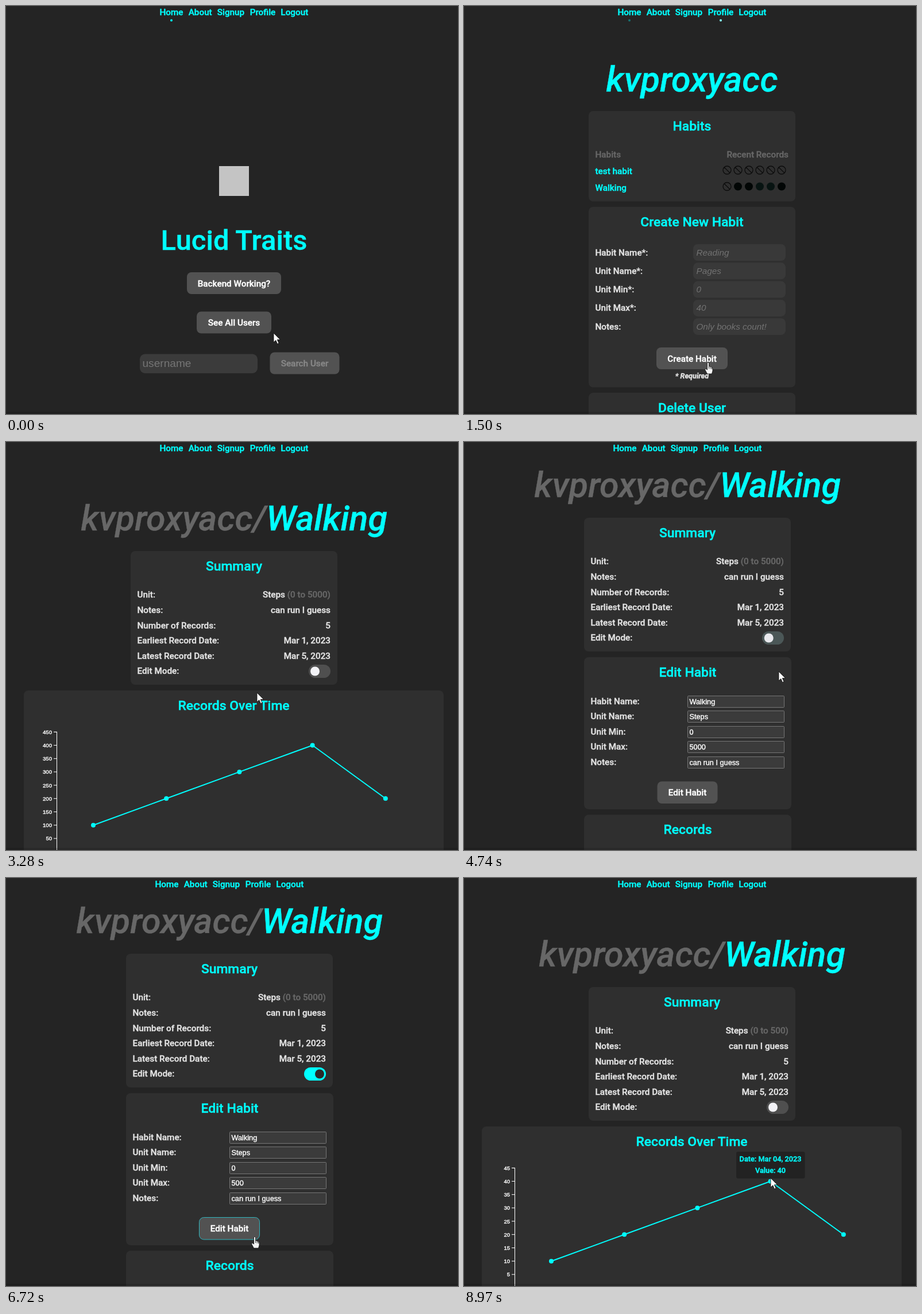
Recreate the animation shown at these times as an HTML page. Size 787x711 px, loop 9040 ms.

```html
<!DOCTYPE html>
<html lang="en">
<head>
<meta charset="utf-8">
<title>Habit tracker demo</title>
<style>
  html, body { margin: 0; width: 100%; height: 100%; overflow: hidden; background: #242424; }
  svg { display: block; }
  text { font: 500 15.28px Roboto, sans-serif; white-space: pre; stroke-width: .4px; }
  .h1 { font-size: 48.9px; }
  .user { font-size: 61.1px; font-style: italic; }
  .h2 { font-size: 22.9px; }
  .ph { font: italic 15.28px "Liberation Sans", Arial, sans-serif; }
  .big { font: 19.1px "Liberation Sans", Arial, sans-serif; }
  .ph, .big { stroke-width: 0; }
  .field { font: 12.73px "Liberation Sans", Arial, sans-serif; }
  .tick { font: 9.55px "Liberation Sans", Arial, sans-serif; }
  .tip { font-size: 12.73px; }
  .req { font-size: 12.7px; font-style: italic; font-weight: 700; }
</style>
</head>
<body>
<svg id="stage" width="787" height="711" viewBox="0 0 787 711"></svg>
<script>
const LOOP = 9040, CYAN = '#00ffff', TEXT = '#e3e3e3', GRAY = '#676767';
const USER = 'kvproxyacc', APP = 'Lucid Traits';

// a hairline stroke gives the text its slightly heavy look
const text = (x, y, s, { fill = TEXT, at = 'start', cls = '', id = '' } = {}) =>
  `<text x="${x}" y="${y}" fill="${fill}" stroke="${fill}" text-anchor="${at}" class="${cls}" id="${id}">${s}</text>`;
const mid = (x, y, s, cls = '', fill = CYAN) => text(x, y, s, { fill, cls, at: 'middle' });
const box = (x, y, w, h, fill, r = 8, more = '') =>
  `<rect x="${x}" y="${y}" width="${w}" height="${h}" rx="${r}" fill="${fill}" ${more}/>`;
const panel = (x, y, w, h, title, base) =>
  box(x, y, w, h, '#2f2f2f') + mid(x + w / 2, base, title, 'h2');
const button = (x, y, w, h, label, fill = '#fff', more = '') =>
  box(x, y, w, h, '#525252', 8, more) + mid(x + w / 2, y + 24.5, label, '', fill);
const dot = (x, y, r, more = '') => `<circle cx="${x}" cy="${y}" r="${r}" fill="${CYAN}" ${more}/>`;
const group = (id, ...parts) => `<g id="${id}">${parts.join('')}</g>`;
const each = (list, fn) => list.map(fn).join('');

const nav = group('nav',
  each([['Home', 288], ['About', 338.2], ['Signup', 391.5], ['Profile', 447], ['Logout', 502.3]],
    ([s, x]) => mid(x, 16, s)),
  dot(288, 25, 2, 'id="homeDot"'), dot(447, 25, 2, 'id="profileDot" style="fill:#8ff"'));

const home = group('home',
  box(371, 279, 52, 52, '#c4c4c4', 0),
  mid(397, 425, APP, 'h1'),
  button(315, 464, 164, 38, 'Backend Working?'),
  button(332, 532.5, 130, 38, 'See All Users'),
  box(233, 606.5, 205, 33.5, '#3b3b3b', 9),
  text(237.5, 629, 'username', { fill: '#757575', cls: 'big' }),
  button(459.5, 603.5, 121, 38, 'Search User', '#878787'));

const noRecord = (x, y) =>
  `<path d="M${x - 5} ${y - 5}l10 10M${x - 7} ${y}a7 7 0 1 0 14 0a7 7 0 1 0-14 0" fill="none" stroke="#0c0c0c" stroke-width="1.3"/>`;
const days = [0, 1, 2, 3, 4, 5].map(i => 458 + 19 * i);

const profile = group('profile',
  mid(397, 148.5, USER, 'user'),
  panel(217, 183, 360, 157.5, 'Habits', 217),
  text(228.5, 264, 'Habits', { fill: GRAY }),
  text(565, 264, 'Recent Records', { fill: GRAY, at: 'end' }),
  text(228.5, 293, 'test habit', { fill: CYAN }),
  text(228.5, 321.5, 'Walking', { fill: CYAN }),
  each(days, x => noRecord(x, 286)),
  noRecord(458, 314.5),
  each(days.slice(1), (x, i) => dot(x, 314.5, 7, `style="fill:${i == 2 || i == 3 ? '#081412' : '#020605'}"`)),
  panel(217, 350, 360, 314.5, 'Create New Habit', 384),
  each([['Habit Name*:', 'Reading'], ['Unit Name*:', 'Pages'], ['Unit Min*:', '0'],
    ['Unit Max*:', '40'], ['Notes:', 'Only books count!']], ([label, hint], i) => {
    const y = 434.5 + 32.3 * i;
    return text(228.5, y, label) + box(399, y - 19.5, 161, 29, '#393939', 8) +
      text(404.5, y, hint, { fill: '#727272', cls: 'ph' });
  }),
  button(335, 595, 124, 38, 'Create Habit'),
  mid(397, 649, '* Required', 'req', TEXT),
  panel(217, 674, 360, 60, 'Delete User', 708));

const rows = [['Unit:', `Steps <tspan fill="${GRAY}" stroke="${GRAY}" id="range"></tspan>`],
  ['Notes:', 'can run I guess'], ['Number of Records:', '5'], ['Earliest Record Date:', 'Mar 1, 2023'],
  ['Latest Record Date:', 'Mar 5, 2023'], ['Edit Mode:', '']];
const summary = group('summary',
  text(453, 154, USER + '/', { fill: GRAY, cls: 'user', at: 'end' }),
  text(453, 154, 'Walking', { fill: CYAN, cls: 'user' }),
  panel(217, 190, 360, 233, 'Summary', 224),
  each(rows, ([label, value], i) => {
    const y = 271.3 + 26.6 * i;
    return text(228.5, y, label) + text(565, y, value, { at: 'end' });
  }),
  box(527, 388, 38, 23, '#4f4f4f', 11.5, 'id="track"'),
  dot(538, 399.5, 8, 'id="knob"'));

const tickY = i => 505.3 + 23.2 * i;
const points = [7, 5, 3, 1, 5].map((v, i) => [152 + 127.2 * i, tickY(v)]);
const chart = group('chart',
  panel(31, 433, 731, 300, 'Records Over Time', 467),
  `<path d="M83 505.5H88.5V711" fill="none" stroke="#fff"/>`,
  each([...Array(10).keys()], i => `<path d="M83 ${tickY(i)}h6" stroke="#fff"/>` +
    text(80, tickY(i) + 3.4, '', { fill: '#fff', at: 'end', cls: 'tick', id: 'tick' + i })),
  `<polyline points="${points.join(' ')}" fill="none" stroke="${CYAN}" stroke-width="2"/>`,
  each(points, ([x, y]) => dot(x, y, 4)),
  group('tooltip', box(474, 477, 119.5, 46.5, '#222', 3),
    mid(533.5, 494, 'Date: Mar 04, 2023', 'tip'), mid(533.5, 514, 'Value: 40', 'tip')));

const edit = group('edit',
  panel(209, 375, 361, 265, 'Edit Habit', 409),
  each([['Habit Name:', 'Walking'], ['Unit Name:', 'Steps'], ['Unit Min:', '0'],
    ['Unit Max:', '5000'], ['Notes:', 'can run I guess']], ([label, value], i) => {
    const y = 456.5 + 26.6 * i;
    return text(220.5, y, label) +
      box(389.5, Math.round(y - 14) - .5, 168, 20, '#3b3b3b', 1, 'stroke="#767676"') +
      text(392.5, y, value, { fill: '#fff', cls: 'field', id: 'field' + i });
  }),
  button(336.5, 591.5, 105, 38.5, 'Edit Habit', '#fff', 'id="save" stroke="#2fb4bd"'),
  panel(209, 649.5, 361, 80, 'Records', 683));

const cursor = group('cursor',
  '<path id="arrow" d="M0 0V16l3.8-3.4 2.7 6.1 2.5-1.1-2.7-6H11.5z" fill="#fff" stroke="#111" stroke-width=".8"/>',
  `<path id="hand" d="M-1.5 1Q0-1 1.5 1V7Q3 6 4 8 5.500 7 6.500 9 8 8.500 8 11V15L6.500 20H-1.500L-5 13.500
    Q-6 11-4 11L-1.500 13ZM1.500 7V11M4.200 8V11.500M6.500 9V12" fill="#f4f4f4" stroke="#111" stroke-width=".8"/>`);

const $ = id => document.getElementById(id);
$('stage').innerHTML = box(0, 0, 787, 711, '#242424', 0) + home + profile + summary + chart + edit + nav +
  box(0, 707.5, 787, 4, 'rgba(0,0,0,.15)', 0) + cursor;

// time, x, y of the pointer tip
const path = [[0, 466, 570], [70, 466, 570], [740, 447, 12], [950, 447, 12], [1450, 425, 621],
  [1700, 425, 621], [2550, 256, 316], [2890, 256, 316], [3260, 437, 437], [3700, 437, 437],
  [4400, 548, 400], [4780, 548, 400], [5400, 436, 530], [6250, 436, 530], [6620, 433, 625],
  [7500, 433, 625], [7690, 523, 628], [7800, 523, 628], [8300, 534, 523], [LOOP, 534, 523]];
const handTimes = [[700, 1000], [1400, 1760], [2430, 2890], [4330, 4740], [6580, 7510]];

const clamp = v => Math.max(0, Math.min(1, v));
const ease = v => v * v * (3 - 2 * v);
const mix = (a, b, p) => a + (b - a) * p;
const rgb = (a, b, p) => `rgb(${a.map((v, i) => Math.round(mix(v, b[i], p)))})`;
const show = (id, on) => $(id).style.display = on ? '' : 'none';
const put = (id, s) => { if ($(id).textContent !== s) $(id).textContent = s; };

function draw(t) {
  const page = t < 780 ? 'home' : t < 2890 ? 'profile' : t >= 4740 && t < 7510 ? 'edit' : 'chart';
  for (const id of ['home', 'profile', 'chart', 'edit']) show(id, id === page);
  const editing = page === 'edit', saved = t >= 7510;
  show('summary', editing || page === 'chart');
  show('homeDot', t < 2890);
  show('profileDot', page === 'profile');
  $('homeDot').style.opacity = mix(1, .35, clamp((t - 780) / 300));
  $('nav').setAttribute('transform', `translate(${editing ? -8 : 0})`);
  $('summary').setAttribute('transform', editing ? 'translate(-8 -58)' : '');

  put('range', saved ? '(0 to 500)' : '(0 to 5000)');
  for (let i = 0; i < 10; i++) put('tick' + i, String((9 - i) * (saved ? 5 : 50)));
  put('field3', t < 6000 ? '5000' : '500');
  show('tooltip', t >= 8240);

  const on = editing ? ease(clamp((t - 4690) / 400)) : 0;
  $('track').style.fill = rgb([79, 79, 79], [0, 255, 255], on);
  $('knob').style.fill = rgb([242, 242, 246], [42, 42, 42], on);
  $('knob').setAttribute('cx', mix(538, 554, on));
  $('save').style.strokeOpacity = clamp((t - 6560) / 160);

  const k = Math.max(1, path.findIndex(p => p[0] > t));
  const [t0, x0, y0] = path[k - 1], [t1, x1, y1] = path[k];
  const p = ease(clamp((t - t0) / (t1 - t0)));
  $('cursor').setAttribute('transform', `translate(${mix(x0, x1, p)} ${mix(y0, y1, p)})`);
  const hand = handTimes.some(([a, b]) => t >= a && t < b);
  show('hand', hand);
  show('arrow', !hand);
}

const start = performance.now();
function frame() {
  draw((performance.now() - start) % LOOP);
  requestAnimationFrame(frame);
}
frame();
</script>
</body>
</html>
```
